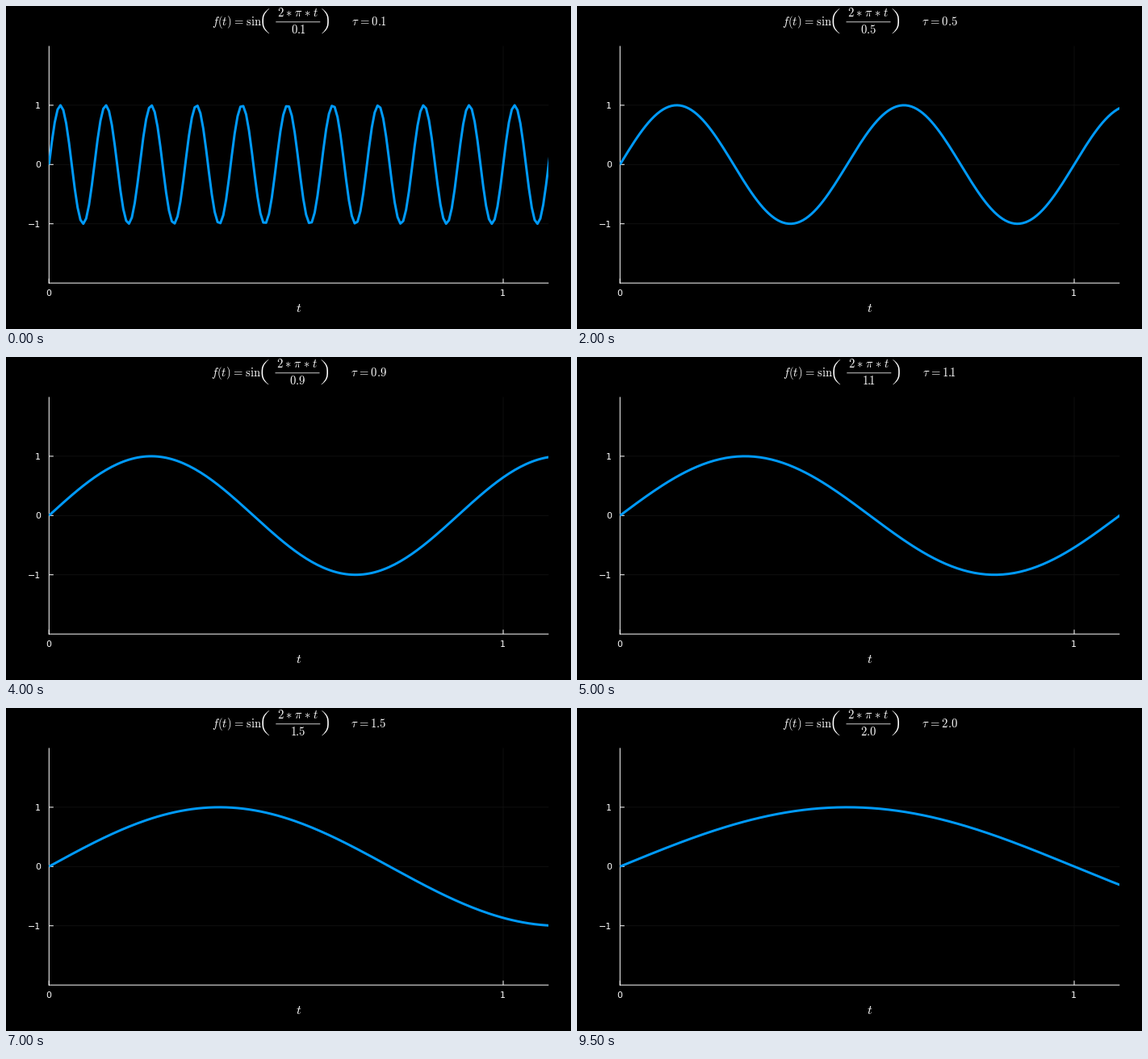
Recreate the animation shown at these times as a matplotlib script. Size 700 by 400 pixels, loop 10 s.

```python
import numpy as np
import matplotlib.pyplot as plt
from matplotlib.animation import FuncAnimation
from matplotlib.patches import PathPatch, Rectangle
from matplotlib.path import Path

W, H, DPI = 700, 400, 100
PT = 72 / DPI  # points per pixel
LEFT, RIGHT, TOP, BOTTOM = 53.3, 672.3, 49.5, 343.1
ZERO_Y, UNIT_Y, UNIT_X = 196.3, 73.4, 562.7
WHITE, BLUE, GRID = "white", "#009afa", "#0f0f0f"
MATH_SIZE = 14.65
FRAMES, INTERVAL = 20, 500

plt.rcParams["mathtext.fontset"] = "cm"
plt.rcParams["font.family"] = "DejaVu Sans"

fig = plt.figure(figsize=(W / DPI, H / DPI), dpi=DPI, facecolor="black")
ax = fig.add_axes([0, 0, 1, 1])
ax.set(xlim=(0, W), ylim=(H, 0))
ax.axis("off")


def px(t):
    return LEFT + UNIT_X * t


def py(value):
    return ZERO_Y - UNIT_Y * value


def stroke(xs, ys, color=WHITE, width=1, z=2):
    return ax.plot(xs, ys, color=color, lw=width * PT, zorder=z,
                   solid_capstyle="butt", snap=False)[0]


def label(x, y, text, size=MATH_SIZE, ha="center"):
    return ax.text(x, y, text, color=WHITE, fontsize=size * PT,
                   ha=ha, va="baseline")


def paren(tip_x, back_x):
    """Tall bracket opening from back_x towards tip_x."""
    top, mid, low = 3, 18.7, 34.4
    side = 1 if tip_x > back_x else -1
    inner = back_x + 1.6 * side
    verts = [(tip_x, top),
             (back_x, top + 6), (back_x, mid - 5), (back_x, mid),
             (back_x, mid + 5), (back_x, low - 6), (tip_x, low),
             (tip_x, low - 0.5),
             (inner, low - 7), (inner, mid + 5), (inner, mid),
             (inner, mid - 5), (inner, top + 7), (tip_x, top + 0.5),
             (tip_x, top)]
    codes = ([Path.MOVETO] + [Path.CURVE4] * 6 + [Path.LINETO]
             + [Path.CURVE4] * 6 + [Path.CLOSEPOLY])
    return Path(verts, codes)


def number(tau):
    """Decimal with tighter spacing between the point and a 1."""
    whole, digit = f"{tau:.1f}".split(".")
    before = -0.1 if whole == "1" else 0.0
    after = -0.3 if digit == "1" else -0.2  # undoes the space after a point
    return rf"{whole}\hspace{{{before}}}.\hspace{{{after}}}{digit}"


# Axes, grid and ticks
for v in (-1, 0, 1):
    stroke([LEFT, RIGHT], [py(v)] * 2, GRID, z=1)
    stroke([LEFT, LEFT + 5.5], [py(v)] * 2)
    label(43.2, py(v) + 3.8, str(v).replace("-", "\u2212"), 11, "right")
for t in (0, 1):
    stroke([px(t)] * 2, [TOP, BOTTOM], GRID, z=1)
    stroke([px(t)] * 2, [BOTTOM, BOTTOM - 5.5])
    label(px(t) - 0.3, 359, str(t), 11)
stroke([LEFT, LEFT], [TOP, BOTTOM + 0.5])
stroke([LEFT - 0.5, RIGHT], [BOTTOM, BOTTOM])
label(362.8, 379, "$t$", 16)

# Title
GAP = r"\hspace{0.08}"
STAR = GAP + "*" + GAP
EQUALS = GAP + "=" + GAP
BAR = np.array([333.5, 388.5])
BRACKETS = [(325.3, 316.6), (390.6, 399.0)]
HEAD_X, FRACTION_X = 285.2, 361

head = label(HEAD_X, 24, rf"$f(t){EQUALS}\mathrm{{sin}}$")
numerator = label(FRACTION_X, 13, rf"$2{STAR}\pi{STAR}t$")
denominator = label(FRACTION_X, 34.2, "")
tau_text = label(449.2, 24, "")
bar = stroke(BAR, [19.8, 19.8], width=0.8)
brackets = [ax.add_patch(PathPatch(paren(*ends), fc=WHITE, lw=0))
            for ends in BRACKETS]

# Curve, sampled coarsely enough for short periods to look faceted
ts = np.linspace(0, 2 * np.pi, 1000)
curve = stroke(px(ts), py(0 * ts), BLUE, 3, z=4)
curve.set_solid_joinstyle("round")
curve.set_clip_path(Rectangle((53, TOP), 619, BOTTOM - TOP,
                              transform=ax.transData))


def update(i):
    tau = (i + 1) / 10
    text = number(tau)
    shift = 0.8 if "1" in f"{tau:.1f}" else 0
    curve.set_ydata(py(np.sin(2 * np.pi * ts / tau)))
    head.set_x(HEAD_X + shift)
    for part in (numerator, denominator):
        part.set_x(FRACTION_X + shift)
    for patch, (tip, back) in zip(brackets, BRACKETS):
        patch.set_path(paren(tip + shift, back + shift))
    bar.set_xdata(BAR + shift)
    denominator.set_text(f"${text}$")
    tau_text.set_text(rf"$\tau{EQUALS}{text}$")
    return []


anim = FuncAnimation(fig, update, frames=FRAMES, interval=INTERVAL,
                     repeat=True, repeat_delay=0)
plt.show()
```
